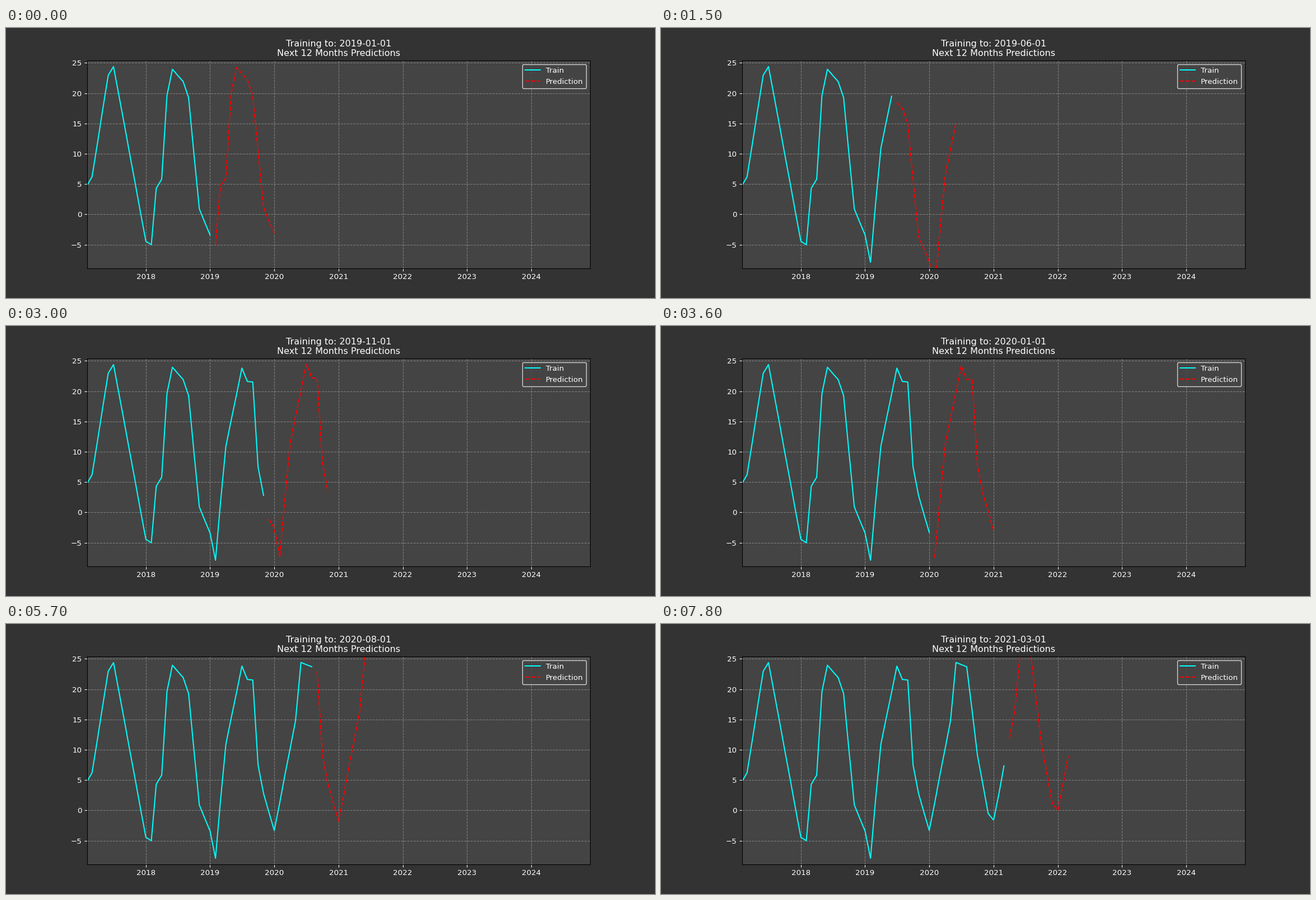
These frames come from a looping animation (1159x483 px, 8 s). A matplotlib script:

```python
import numpy as np
import matplotlib.pyplot as plt
import matplotlib.dates as mdates
from matplotlib.animation import FuncAnimation

WIDTH, HEIGHT, DPI = 1159, 483, 96
TICK_MS, LOOP_MS, HOLD = 100, 8000, 3   # a new month every HOLD ticks
SEASON, PHI = 12, -0.4                  # seasonal lag, AR(1) term
FIRST_CUT, LAST_CUT = 23, 49            # 2019-01 to 2021-03

# corners of the temperature curve: months since 2017-02, degrees
CORNERS = [
    (0, 4.8), (1, 6.2), (4.6, 26.3), (11.7, -7.8),
    (13, 4.3), (14, 5.8), (15.36, 24.6), (18.8, 21.1), (21, 0.9),
    (23, -3.4), (24, -7.9), (26, 10.9), (29, 23.8), (30, 21.6), (31, 21.5),
    (32.15, 5.4), (35, -3.3), (39, 14.8), (40, 24.4), (42, 23.7),
    (44, 9.1), (46.6, -3.4), (49, 7.35),
]
TEMPS = np.interp(np.arange(LAST_CUT + 1), *zip(*CORNERS))
MONTHS = np.datetime64("2017-02") + np.arange(len(TEMPS) + SEASON)
DAYS = MONTHS.astype("datetime64[D]")


def forecast(cut):
    """Repeat the last season, shifted by an integrated AR(1) on yearly change."""
    before, now = TEMPS[cut - 1:cut + 1] - TEMPS[cut - 1 - SEASON:cut + 1 - SEASON]
    steps = (now - before) * PHI ** np.arange(1, SEASON + 1)
    return TEMPS[cut + 1 - SEASON:cut + 1] + now + np.cumsum(steps)


plt.rcParams.update({
    "font.family": "DejaVu Sans",
    "figure.facecolor": "#333333",
    "axes.facecolor": "#444444",
    "text.color": "white",
    "xtick.color": "white",
    "ytick.color": "white",
    "legend.edgecolor": "white",
})

fig, ax = plt.subplots(figsize=(WIDTH / DPI, HEIGHT / DPI), dpi=DPI)
train, = ax.plot([], [], color="cyan", label="Train")
pred, = ax.plot([], [], color="red", ls="--", label="Prediction")
ax.set_xlim(np.datetime64("2017-02-01"), np.datetime64("2024-12-01"))
ax.set_ylim(TEMPS.min() - 1, TEMPS.max() + 1)
ax.xaxis.set_major_locator(mdates.YearLocator())
ax.xaxis.set_major_formatter(mdates.DateFormatter("%Y"))
ax.grid(color="gray", ls="--")
ax.legend(loc="upper right")
title = ax.set_title("")


def update(tick):
    cut = FIRST_CUT + tick // HOLD
    train.set_data(DAYS[:cut + 1], TEMPS[:cut + 1])
    pred.set_data(DAYS[cut + 1:cut + 1 + SEASON], forecast(cut))
    title.set_text(f"Training to: {DAYS[cut]}\nNext 12 Months Predictions")
    return train, pred, title


anim = FuncAnimation(fig, update, frames=LOOP_MS // TICK_MS, interval=TICK_MS,
                     repeat=True, repeat_delay=0, blit=False)
plt.show()
```
